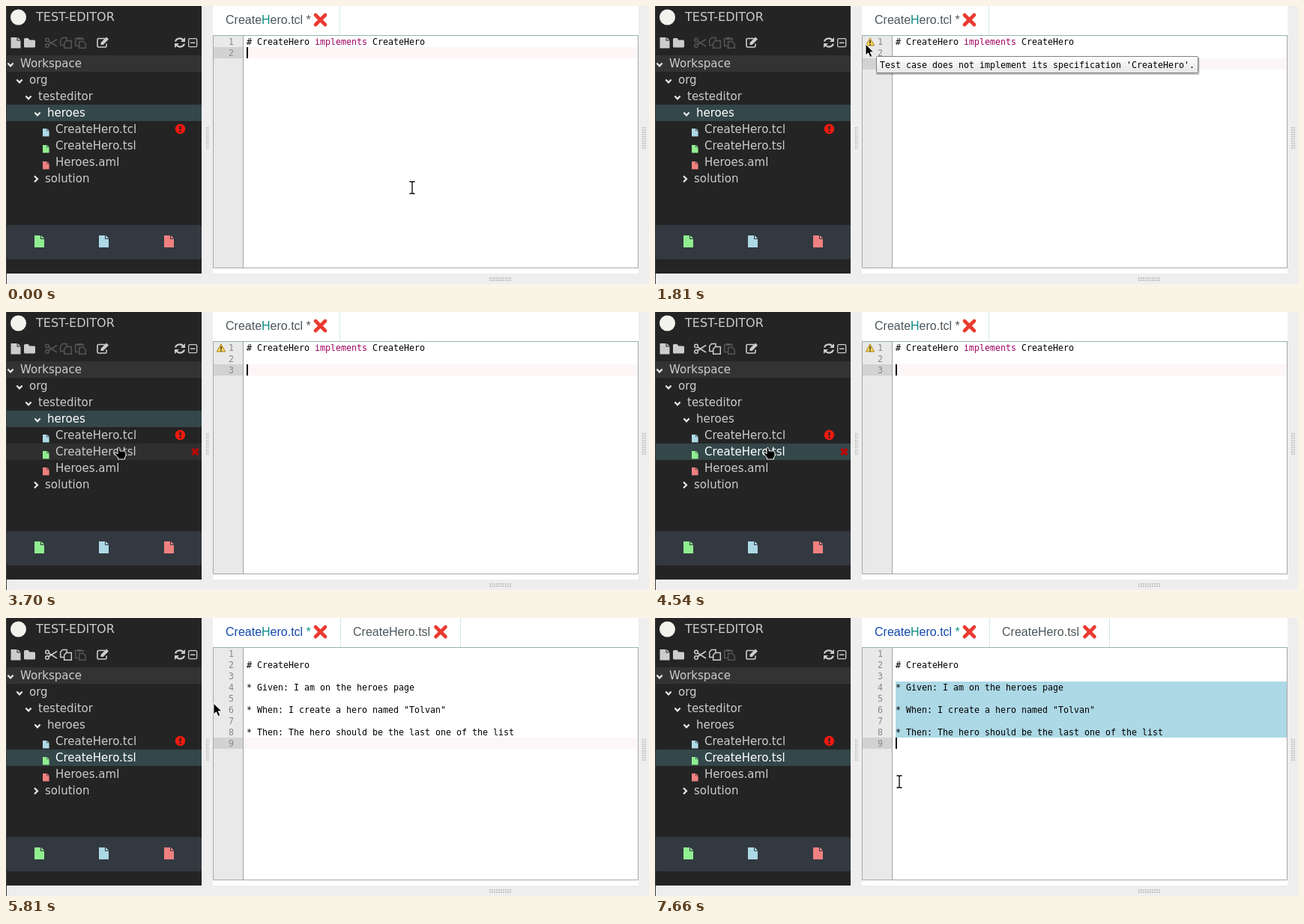
These frames come from a looping animation (858 by 372 pixels, 8 s). An HTML page:

```html
<!DOCTYPE html>
<html lang="en">
<head>
<meta charset="utf-8">
<title>Editor</title>
<style>
html, body { margin: 0; width: 100%; height: 100%; overflow: hidden; background: #eee; }
svg { display: block; width: 858px; height: 372px; }
text { white-space: pre; }
.tree { font: 15px "DejaVu Sans", sans-serif; fill: #ccc; }
.tab { font: 16px "Liberation Sans", Arial, sans-serif; fill: #4c565c; }
.code { font: 11.63px "DejaVu Sans Mono", monospace; fill: #000; }
.num { fill: #888; text-anchor: end; }
.key { fill: #a00060; }
</style>
</head>
<body>
<svg viewBox="0 0 858 372" xmlns="http://www.w3.org/2000/svg">
  <defs>
    <pattern id="dots" width="3" height="3" patternUnits="userSpaceOnUse">
      <rect width="2" height="2" fill="#c6c6c6"/>
    </pattern>
    <linearGradient id="tipFill" x2="0" y2="1">
      <stop stop-color="#fff"/><stop offset="1" stop-color="#e6e6e6"/>
    </linearGradient>
    <path id="file" d="M0 0H8V5H13V16H0ZM9 0L13 4H9Z"/>
    <path id="cross" d="M-6.5 -6.5L6.5 6.5M6.5 -6.5L-6.5 6.5" stroke="#ea3a30" stroke-width="4.6" stroke-linecap="round"/>
    <path id="down" d="M-3.6 -2L0 1.8L3.6 -2" fill="none" stroke="#e8e8e8" stroke-width="2.2"/>
  </defs>

  <rect width="858" height="372" fill="#eee"/>
  <rect x="276" width="568" height="358" fill="#fff"/>
  <rect width="261" height="358" fill="#242424"/>
  <rect width="1" height="372" fill="#3a3a3a"/>
  <rect x="266" y="162" width="5" height="30" fill="url(#dots)"/>
  <rect x="849" y="162" width="5" height="30" fill="url(#dots)"/>
  <rect x="644" y="363" width="30" height="5" fill="url(#dots)"/>

  <!-- sidebar header and tools -->
  <circle cx="16.5" cy="15" r="10.5" fill="#f3f3ee"/>
  <text class="tree" x="40" y="20" style="font-size:16px">TEST-EDITOR</text>
  <g fill="#ccc">
    <use href="#file" transform="translate(6.500 42) scale(1 .9)"/>
    <path d="M24 44.500q0-1.500 1.500-1.500h4l2 2.500h6q1.500 0 1.500 1.500v7q0 1.500-1.500 1.500h-12q-1.500 0-1.500-1.500z"/>
    <path d="M132 43.500h-8.500q-1.500 0-1.500 1.500v8.500q0 1.500 1.500 1.500h9q1.500 0 1.500-1.500v-3" fill="none" stroke="#ccc" stroke-width="1.600"/>
    <path d="M126.500 52v-3l7.500-7.500 3 3-7.500 7.500z"/>
    <path d="M226 47.500a6 5.500 0 0 1 10.500-2M238 50.500a6 5.500 0 0 1-10.500 2" fill="none" stroke="#ccc" stroke-width="2.200"/>
    <path d="M239 42v6h-6zM225 56v-6h6z"/>
    <rect x="243.700" y="43.700" width="11" height="11" rx="1.500" fill="none" stroke="#ccc" stroke-width="1.300"/>
    <rect x="246" y="48.500" width="6.500" height="1.500"/>
  </g>
  <g id="clip" fill="none" stroke-width="1.500">
    <circle cx="55" cy="45.500" r="2.300"/><circle cx="55" cy="53" r="2.300"/>
    <path d="M57 47L68 54M57 51.500L68 44.500"/>
    <path d="M77 52.500H72.700V45.500L75.500 42.500H81V46M77.700 49.500L80.500 46.500H87.300V56.300H77.700Z"/>
  </g>
  <path d="M97 53.500H92.700V43.500H103V46M97.700 47.500H103L106.300 50.500V56.300H97.700Z" fill="none" stroke="#555" stroke-width="1.500"/>
  <rect x="95" y="42" width="5.500" height="3" fill="#555"/>

  <!-- tree -->
  <rect x="1" y="66" width="260" height="22" fill="#333"/>
  <rect id="hover" x="1" width="260" height="22" fill="#2f2f2f"/>
  <rect id="pick" x="1" width="260" height="22" fill="#34474a"/>
  <g id="tree"></g>
  <path d="M38 227.500L42 231.500L38 235.500" fill="none" stroke="#e8e8e8" stroke-width="2.200"/>
  <circle cx="232.500" cy="164.500" r="6.700" fill="#f01a10"/>
  <path d="M232.500 160.500V165.500M232.500 167V169" stroke="#242424" stroke-width="2.200"/>
  <path id="del" d="M-4 -4L4 4M4 -4L-4 4" stroke="#b80808" stroke-width="3.400"/>
  <rect x="1" y="293" width="260" height="46" rx="3" fill="#333940"/>
  <use href="#file" x="38" y="307" fill="#90ee90"/>
  <use href="#file" x="124" y="307" fill="#add8e6"/>
  <use href="#file" x="211" y="307" fill="#f08080"/>

  <!-- tabs -->
  <text id="tab1" class="tab" x="293" y="24">Create<tspan fill="#0a8c80">H</tspan>ero.tcl <tspan id="star">*</tspan></text>
  <use href="#cross" x="419.500" y="18.500"/>
  <g id="tab2">
    <text class="tab" x="463" y="24">CreateHero.tsl</text>
    <use href="#cross" x="580" y="18.500"/>
  </g>
  <path id="tabEdge" fill="none" stroke="#d3e9e6"/>

  <!-- editor -->
  <rect id="gutter" x="277" y="40" width="39" height="310" fill="#e9e9e9"/>
  <rect id="rowNum" x="277" width="39" height="15" fill="#d2d2d2"/>
  <rect id="rowBg" x="317" width="526" height="15" fill="#fdf6f7"/>
  <rect id="sel" x="321" y="85" width="522" fill="#add8e6"/>
  <path id="gutterEdge" d="M316.500 40V350" stroke="#a2a2a2"/>
  <g id="nums"></g>
  <text id="tcl" class="code" x="321" y="52"># CreateHero <tspan class="key">implements</tspan> CreateHero</text>
  <g id="tsl"></g>
  <rect id="caret" x="321" width="2" height="15"/>
  <path d="M276.500 39V350.500H843.500V39" fill="none" stroke="#a8a8a8"/>
  <path d="M276 39.500H844" stroke="#93b3ae"/>
  <g id="warn">
    <path d="M287 42.800L292.700 53H281.300Z" fill="#f8d552" stroke="#a98224" stroke-linejoin="round"/>
    <path d="M287 46V50M287 51V52.400" stroke="#222" stroke-width="1.500"/>
  </g>

  <g id="tip">
    <rect x="0" y="1.500" width="431.500" height="23.500" rx="2" fill="#000" opacity=".25"/>
    <rect x=".5" y=".5" width="429" height="22" rx="1" fill="url(#tipFill)" stroke="#808080"/>
    <text class="code" x="5" y="16">Test case does not implement its specification 'CreateHero'.</text>
  </g>

  <g id="beam" fill="none">
    <path d="M-3.500 -8H-1L0 -7L1 -8H3.500M0 -7V7M-3.500 8H-1L0 7L1 8H3.500" stroke="#fff" stroke-width="3"/>
    <path d="M-3.500 -8H-1L0 -7L1 -8H3.500M0 -7V7M-3.500 8H-1L0 7L1 8H3.500" stroke="#000" stroke-width="1.300"/>
  </g>
  <path id="arrow" d="M0 0V15L3.500 11.800L6 17.500L8.800 16.300L6.300 10.800H11Z" fill="#000" stroke="#fff"/>
  <path id="hand" d="M-2 0Q0 -1.500 1 .5V4H7Q9 4.500 9 7V10L7.500 13V15H-1.500V13L-6 7.500Q-6 5.500 -4 6L-2 8Z" fill="#000" stroke="#fff"/>
</svg>
<script>
const LOOP = 8000;
const $ = id => document.getElementById(id);
const show = (id, on) => $(id).setAttribute("display", on ? "inline" : "none");
const set = (id, name, value) => $(id).setAttribute(name, value);
const move = (id, x, y) => set(id, "transform", `translate(${x} ${y})`);
const rowTop = i => 66 + 22 * i;
const lineTop = n => 40 + 15 * (n - 1);

// label, text x, chevron x, icon colour
const rows = [
  ["Workspace", 19, 6], ["org", 31, 18], ["testeditor", 43, 30], ["heroes", 55, 42],
  ["CreateHero.tcl", 66, 0, "#add8e6"], ["CreateHero.tsl", 66, 0, "#90ee90"],
  ["Heroes.aml", 66, 0, "#f08080"], ["solution", 52]
];
$("tree").innerHTML = rows.map(([label, x, chev, fill], i) => {
  const y = rowTop(i);
  return `<text id="row${i}" class="tree" x="${x}" y="${y + 16}">${label}</text>` +
    (chev ? `<use href="#down" x="${chev}" y="${y + 12.5}"/>` : "") +
    (fill ? `<use href="#file" fill="${fill}" transform="translate(49 ${y + 95 / 10 - .5 + 5 - 4}) scale(.66)"/>` : "");
}).join("");

const spec = {
  2: "# CreateHero",
  4: "* Given: I am on the heroes page",
  6: '* When: I create a hero named "Tolvan"',
  8: "* Then: The hero should be the last one of the list"
};
$("tsl").innerHTML = Object.entries(spec).map(([n, s]) =>
  `<text class="code" x="321" y="${lineTop(n) + 12}">${s}</text>`).join("");
for (let n = 1; n <= 9; n++)
  $("nums").innerHTML += `<text id="n${n}" class="code num" x="304" y="${lineTop(n) + 12}">${n}</text>`;

// time, x, y of the pointer
const path = [
  [1230, 542, 243], [1380, 440, 170], [1500, 310, 90], [1620, 244, 60], [1720, 262, 56],
  [1810, 281, 51], [2010, 286, 47], [3130, 286, 47], [3170, 278, 55], [3320, 236, 95],
  [3500, 178, 150], [3700, 151, 182], [5380, 151, 182], [5560, 190, 160], [5800, 275, 115],
  [6000, 316, 96], [6120, 325, 92], [6270, 325, 92], [6400, 323, 108], [6460, 321, 136],
  [6600, 323, 172], [6770, 325, 202], [7180, 325, 202], [7250, 326, 219]
];
function pointer(t) {
  const k = path.findIndex(p => p[0] > t);
  if (k === 0) return path[0].slice(1);
  if (k < 0) return path[path.length - 1].slice(1);
  const a = path[k - 1], b = path[k], u = (t - a[0]) / (b[0] - a[0]);
  return [a[1] + (b[1] - a[1]) * u, a[2] + (b[2] - a[2]) * u];
}

const caretOn = [[0, 960], [1450, 3920], [4420, 4740], [4830, 5550], [6050, 7210], [7660, LOOP]];

function activeLine(t) {
  if (t < 420) return 2;
  if (t < 4740) return 3;
  if (t < 5050) return 1;
  if (t < 6300) return 9;
  const y = pointer(t - 50)[1];
  return Math.max(4, Math.min(9, Math.floor((y - 40) / 15) + 1));
}

function draw(t) {
  const opened = t >= 4740, blank = opened && t < 4830, loaded = t >= 5050;
  const [x, y] = pointer(t);

  // sidebar
  const picked = t < 4220 ? 3 : 5;
  const row = x < 261 && y >= 88 && y < 242 ? Math.floor((y - 66) / 22) : -1;
  set("pick", "y", rowTop(picked));
  rows.forEach((r, i) => $("row" + i).style.fill = i === picked ? "#fff" : "#ccc");
  show("hover", row > 0);
  show("del", row > 0);
  if (row > 0) {
    set("hover", "y", rowTop(row));
    move("del", 252.5, rowTop(row) + 11);
  }
  set("clip", "stroke", t < 4540 ? "#555" : "#ccc");

  // tabs
  $("tab1").style.fill = opened ? "#1247ad" : "#4c565c";
  set("star", "fill", opened ? "#0a9488" : "#4c565c");
  show("tab2", opened);
  set("tabEdge", "d", opened ? "M446.500 0V39M606.500 0V39" : "M445.500 0V39");

  // editor
  const line = activeLine(t), top = lineTop(line);
  const count = !opened ? line : loaded ? 9 : 1;
  const selected = t >= 6300 ? line - 4 : 0;
  for (let n = 1; n <= 9; n++) show("n" + n, !blank && n <= count);
  ["gutter", "gutterEdge", "rowNum"].forEach(id => show(id, !blank));
  set("rowNum", "y", top);
  set("rowBg", "y", top);
  show("rowBg", !blank && !selected);
  set("sel", "height", 15 * selected);
  set("caret", "y", top);
  show("caret", caretOn.some(([a, b]) => t >= a && t < b));
  show("tcl", !opened);
  show("tsl", loaded);
  show("warn", t >= 1050 && !opened);

  show("tip", t >= 1760 && t < 3210);
  if (t < 1890) move("tip", 295, 67);
  else move("tip", 300, 63);

  const kind = x > 316 ? "beam" : row > 0 ? "hand" : "arrow";
  for (const id of ["beam", "hand", "arrow"]) show(id, id === kind);
  move(kind, Math.round(x), Math.round(y));
}

const start = performance.now();
function tick() {
  draw((performance.now() - start) % LOOP);
  requestAnimationFrame(tick);
}
tick();
</script>
</body>
</html>
```
